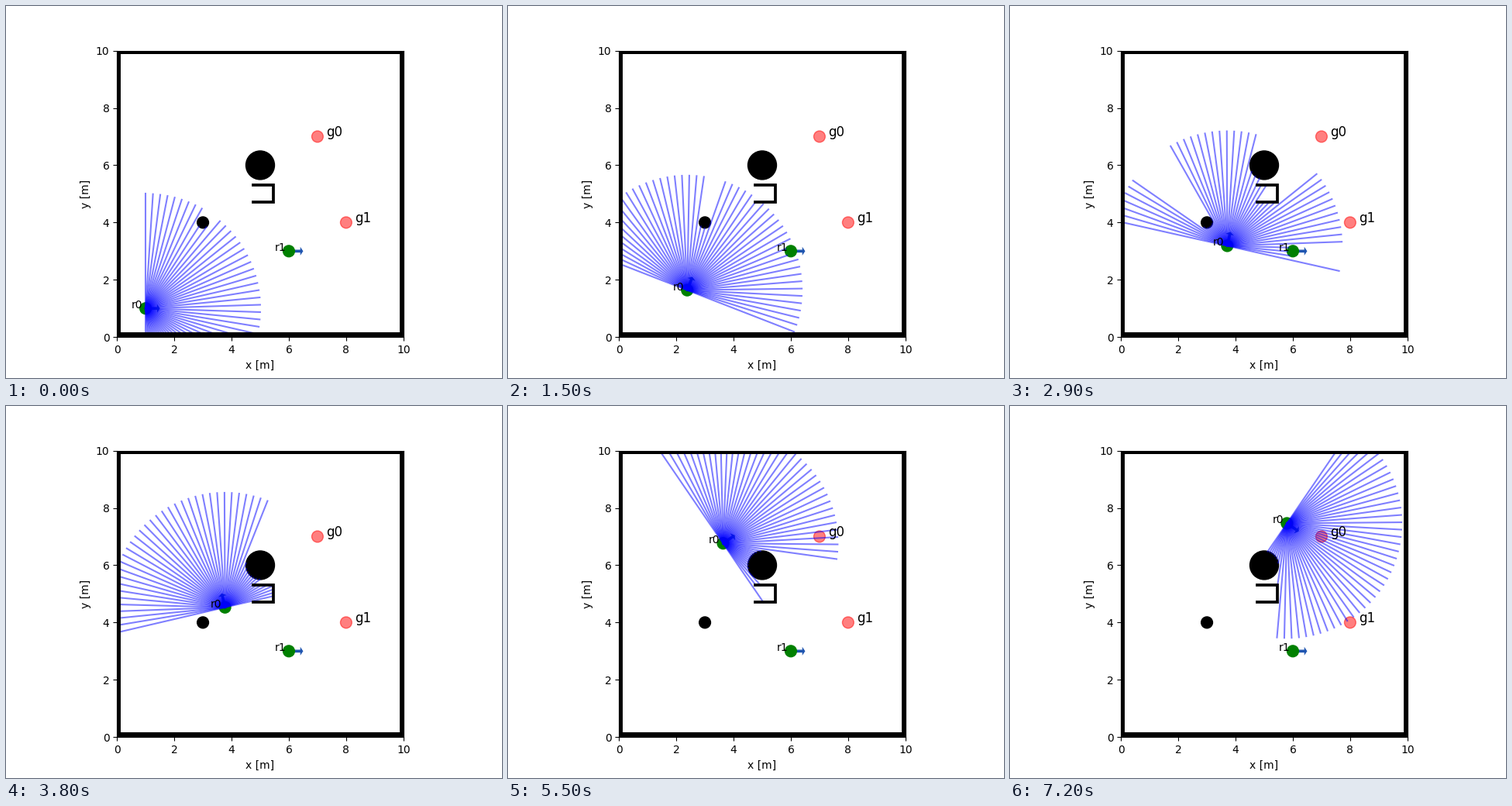
A matplotlib script that plays this animation: 640x480 px, repeating every 8 s.

```python
import numpy as np
import matplotlib.pyplot as plt
from matplotlib.animation import FuncAnimation
from matplotlib.patches import Arrow, Circle, Rectangle

FRAMES, INTERVAL = 80, 100
START = 4                        # frames standing still before the drive
STEP = 0.15                      # metres and radians per control step
RANGE, BEAMS, RADIUS = 4.0, 50, 0.2
WALL, FLOOR = 0.13, 0.16
DRIVE = "S3 L8 S1 R4 S4 L6 S6 L5 S2 R6 S1 R5 S1 L1 S5 R9 S1"
TURN = {"S": 0, "L": 1, "R": -1}

PARKED = (6, 3)
GOALS = [(7, 7), (8, 4)]
OBSTACLES = [(5, 6, 0.5), (3, 4, 0.2)]
BOX = [(4.75, 5.3), (5.45, 5.3), (5.45, 4.7), (4.75, 4.7)]


def drive_path():
    x, y, heading = 1.0, 1.0, 0.0
    poses = [(x, y, heading)]
    for token in DRIVE.split():
        turn = TURN[token[0]]
        for _ in range(int(token[1:])):
            new = heading + turn * STEP
            if turn:             # unit-radius arc
                x += turn * (np.sin(new) - np.sin(heading))
                y += turn * (np.cos(heading) - np.cos(new))
            else:
                x += STEP * np.cos(heading)
                y += STEP * np.sin(heading)
            heading = new
            poses.append((x, y, heading))
    return poses


def hit_circle(pos, ray, circle):
    cx, cy, r = circle
    offset = np.array([cx, cy]) - pos
    along = offset @ ray
    half = r * r - (offset @ offset - along ** 2)
    return along - np.sqrt(half) if half > 0 and along > 0 else RANGE


def hit_segment(pos, ray, a, b):
    a, edge = np.array(a), np.subtract(b, a)
    det = ray[0] * edge[1] - ray[1] * edge[0]
    if abs(det) < 1e-9:
        return RANGE
    d = a - pos
    dist = (d[0] * edge[1] - d[1] * edge[0]) / det
    where = (d[0] * ray[1] - d[1] * ray[0]) / det
    return dist if dist > 0 and 0 <= where <= 1 else RANGE


ROUND = OBSTACLES + [(*PARKED, RADIUS)]
lo, hi = 0.12, 9.88
ROOM = [(lo, lo), (hi, lo), (hi, hi), (lo, hi), (lo, lo)]
SEGMENTS = list(zip(BOX, BOX[1:])) + list(zip(ROOM, ROOM[1:]))


def scan(x, y, heading):
    pos = np.array([x, y])
    for angle in heading + np.linspace(-np.pi / 2, np.pi / 2, BEAMS):
        ray = np.array([np.cos(angle), np.sin(angle)])
        hits = [hit_circle(pos, ray, c) for c in ROUND]
        hits += [hit_segment(pos, ray, a, b) for a, b in SEGMENTS]
        yield pos + min(RANGE, *hits) * ray


def heading_arrow(x, y, heading):
    return Arrow(x, y, 0.5 * np.cos(heading), 0.5 * np.sin(heading),
                 width=0.5, color="#1f55b0", lw=0, zorder=0.9)


def add_robot(x, y, name):
    body = ax.add_patch(Circle((x, y), RADIUS, color="g"))
    label = ax.text(x - 0.5, y, name, fontsize=10, color="k")
    return body, label


plt.rcParams["font.family"] = "DejaVu Sans"
fig, ax = plt.subplots(figsize=(6.4, 4.8), dpi=100)
ax.set_aspect("equal")
ax.set_xlim(0, 10)
ax.set_ylim(0, 10)
ax.set_xlabel("x [m]")
ax.set_ylabel("y [m]")

for corner, w, h in [((0, 0), WALL, 10), ((10 - WALL, 0), WALL, 10),
                     ((0, 0), 10, FLOOR), ((0, 10 - WALL), 10, WALL)]:
    ax.add_patch(Rectangle(corner, w, h, color="k", lw=0, zorder=2.4))
for cx, cy, r in OBSTACLES:
    ax.add_patch(Circle((cx, cy), r, color="k"))
ax.plot(*zip(*BOX), color="k", lw=2.7, solid_joinstyle="miter", zorder=2.4)
for i, (gx, gy) in enumerate(GOALS):
    ax.add_patch(Circle((gx, gy), RADIUS, color="r", alpha=0.5))
    ax.text(gx + 0.3, gy, f"g{i}", fontsize=12, color="k")

POSES = drive_path()
add_robot(*PARKED, "r1")
ax.add_patch(heading_arrow(*PARKED, 0))
body, label = add_robot(*POSES[0][:2], "r0")
beams = [ax.plot([], [], color="b", alpha=0.5, lw=1.5)[0] for _ in range(BEAMS)]
arrows = []


def update(frame):
    x, y, heading = POSES[min(max(frame - START, 0), len(POSES) - 1)]
    body.center = x, y
    label.set_position((x - 0.5, y))
    while arrows:
        arrows.pop().remove()
    arrows.append(ax.add_patch(heading_arrow(x, y, heading)))
    for beam, (ex, ey) in zip(beams, scan(x, y, heading)):
        beam.set_data([x, ex], [y, ey])
    return [body, label, *arrows, *beams]


anim = FuncAnimation(fig, update, frames=FRAMES, interval=INTERVAL,
                     repeat=True, repeat_delay=0)
plt.show()
```
